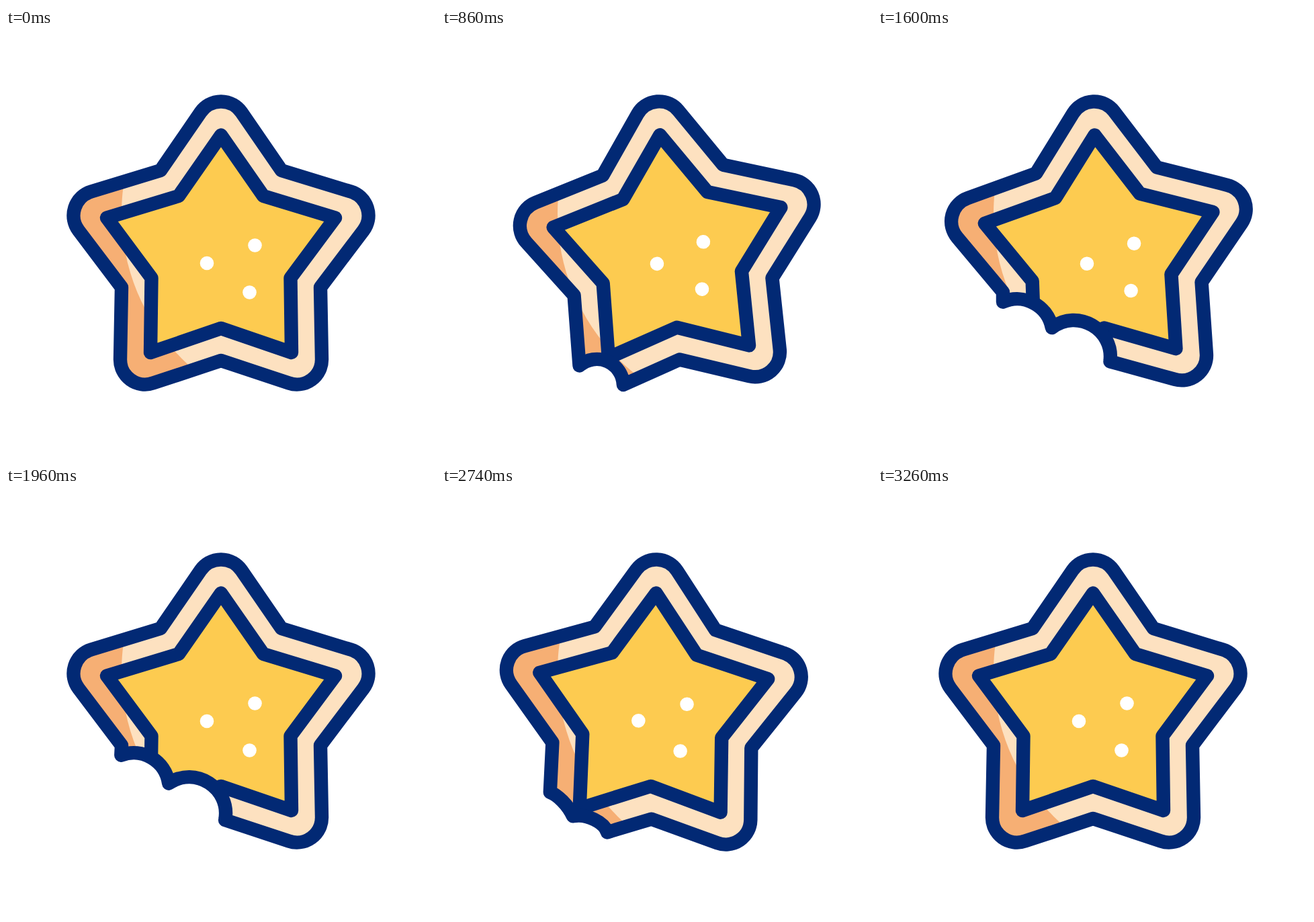
An HTML page for the animation above (3400 ms loop, 640 by 640 pixels).

```html
<!DOCTYPE html>
<html lang="en">
<head>
<meta charset="utf-8">
<title>Star cookie</title>
<style>
  html, body { margin: 0; width: 100%; height: 100%; overflow: hidden; background: #fff; }
  svg { display: block; width: 100vw; height: 100vh; }
  .ink { fill: none; stroke: #022974; stroke-width: 20.4; stroke-linecap: round; stroke-linejoin: round; }
  .ray { fill: none; stroke: #ff6150; stroke-width: 20; stroke-linecap: round; }
</style>
</head>
<body>
<svg viewBox="0 0 640 640">
  <defs><clipPath id="clip"><path id="mask"/></clipPath></defs>
  <g id="star">
    <g clip-path="url(#clip)">
      <rect width="640" height="640" fill="#f6af74"/>
      <circle id="light" cx="477" cy="276" r="305" fill="#fde1c0"/>
      <path class="ink" style="fill:#fdcb50"
        d="M320 159.5 383 250 490 282.5 423.5 372 425 483 320 447 215 483 216.5 372 150 282.5 257 250Z"/>
      <g fill="#fff">
        <circle cx="299" cy="350" r="10.3"/>
        <circle cx="370.5" cy="323.5" r="10.3"/>
        <circle cx="362.5" cy="393.5" r="10.3"/>
      </g>
    </g>
    <path id="edge" class="ink"/>
    <path id="fan" class="ray"/>
  </g>
  <path id="burst" class="ray"/>
</svg>
<script>
const LOOP = 3400;
const PIVOT = '320 110';
const BITES = [345, 1150];
const el = id => document.getElementById(id);
const mix = (a, b, k) => a + (b - a) * k;
const num = v => v.toFixed(2);

function ease(t, from, to) {
  const u = Math.min(1, Math.max(0, (t - from) / (to - from)));
  return u * u * (3 - 2 * u);
}

function track(t, keys) {
  let v = keys[0][1];
  for (let i = 1; i < keys.length; i++) {
    v = mix(v, keys[i][1], ease(t, keys[i - 1][0], keys[i][0]));
  }
  return v;
}

function polar(x, y, r, deg) {
  const a = deg * Math.PI / 180;
  return [x + r * Math.cos(a), y + r * Math.sin(a)];
}

// One cubic piece of a circle: start, two handles, end.
function arc(x, y, r, from, to) {
  const h = 4 / 3 * Math.tan((to - from) * Math.PI / 720) * r;
  const p = polar(x, y, r, from), q = polar(x, y, r, to);
  return [p, polar(...p, h, from + 90), polar(...q, -h, to + 90), q];
}

const join = (a, b, notch) => [...a, ...b.slice(1), notch];
const WHOLE = join(arc(207, 493.5, 37, 181, 126), arc(207, 493.5, 37, 126, 71), [320, 495]);
const ONE = join(arc(194, 523, 39.5, -126, -61.5), arc(194, 523, 39.5, -61.5, 3), [320, 495]);
const TWO = join(arc(190, 450, 52.7, -110.8, -8), arc(273, 487.5, 54, -124.9, 10.2), [326.1, 497.1]);

const REST = 'L421 528.5A37 37 0 0 0 470 493L468 386 532 301.3A37 37 0 0 0 513.3 243.6' +
  'L410 212 350.4 125.4A37 37 0 0 0 289.6 125.4L230 212 126.7 243.6A37 37 0 0 0 108 301.3Z';

function outline(t) {
  let pts = WHOLE;
  const morph = (to, start, end) => {
    const k = ease(t, start, end);
    pts = pts.map((p, i) => [mix(p[0], to[i][0], k), mix(p[1], to[i][1], k)]);
  };
  morph(ONE, BITES[0] + 25, BITES[0] + 150);
  morph(TWO, BITES[1] + 25, BITES[1] + 150);
  morph(WHOLE, 2520, 2890);
  const s = pts.map(p => p.map(num).join(' '));
  return `M172 386L${s[0]}C${s.slice(1, 7).join(' ')}L${s[7]}${REST}`;
}

function ray(x, y, deg, inner, outer) {
  if (outer - inner < 0.5) return '';
  const p = polar(x, y, inner, deg), q = polar(x, y, outer, deg);
  return `M${p.map(num).join(' ')}L${q.map(num).join(' ')}`;
}

function fan(t) {
  const second = t >= BITES[1];
  const p = t - BITES[second ? 1 : 0];
  const x = second ? 230 : 207, y = second ? 455 : 492;
  const inner = mix(46, 117, ease(p, 200, 410));
  const outer = mix(46, 117, ease(p, 50, 202));
  return [167.5, 121.5, 78].map(a => ray(x, y, a, inner, outer)).join('');
}

function burst(t) {
  const inner = 132 * ease(t, 2960, 3180);
  const outer = 132 * ease(t, 2860, 3040);
  return ray(190, 242, 224, inner, outer) + ray(450, 242, -44, inner, outer) +
    ray(177, 435, 151.2, inner, outer) + ray(463, 435, 28.8, inner, outer);
}

const SWING = [[345, 0], [575, 10], [865, -5], [1150, 0], [1380, 10], [1670, -5], [1955, 0],
  [2365, 0], [2580, -5], [2845, 5], [3255, 0]];

function draw(t) {
  const angle = track(t, SWING);
  const d = outline(t);
  el('star').setAttribute('transform', `rotate(${angle} ${PIVOT})`);
  el('light').setAttribute('transform', `rotate(${-angle} ${PIVOT})`);
  el('mask').setAttribute('d', d);
  el('edge').setAttribute('d', d);
  el('fan').setAttribute('d', fan(t));
  el('burst').setAttribute('d', burst(t));
}

const begin = performance.now();
function tick() {
  draw((performance.now() - begin) % LOOP);
  requestAnimationFrame(tick);
}
tick();
</script>
</body>
</html>
```
